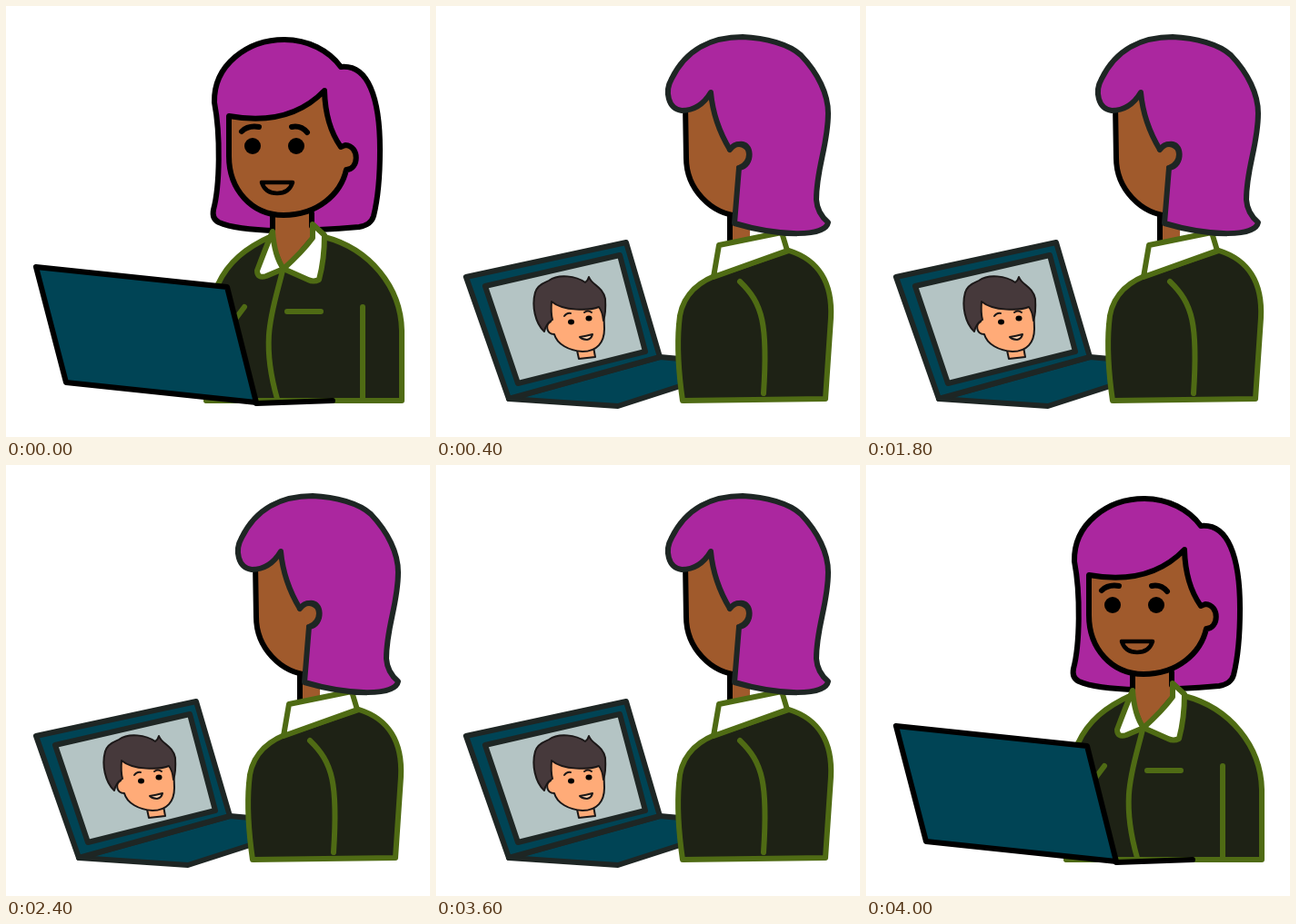
Write an HTML page that moves like this. It is 466 px wide and 474 px high and loops after 4.2 s.

```html
<!DOCTYPE html>
<html lang="en">
<head>
<meta charset="utf-8">
<title>Video call</title>
<style>
html, body { margin: 0; width: 100%; height: 100%; overflow: hidden; background: #fff; }
svg { display: block; width: 466px; height: 474px; }
path { stroke-linecap: round; stroke-linejoin: round; }
.ink, .soft, .coat, .seam, .collar { stroke-width: 6; }
.ink { stroke: #000; }
.soft { stroke: #1e2624; }
.coat, .seam, .collar { stroke: #4f6b14; }
.hair { fill: #ab279f; }
.skin { fill: #a05a2c; }
.coat { fill: #1e2215; }
.collar { fill: #fff; }
.case { fill: #045; }
.glass { fill: #b4c4c4; }
.seam, .line { fill: none; }
.bare { stroke: none; }
.lips { stroke-width: 4.5; }

.pose { visibility: hidden; animation: 4.2s step-end infinite; }
.front { animation-name: front; }
.side { animation-name: side; }
.back { animation-name: back; }
.talk { animation: talk 4.2s step-end infinite; }
@keyframes front {
  0%, 95.238% { visibility: visible; }
  4.762% { visibility: hidden; }
}
@keyframes side {
  0%, 9.524%, 95.238% { visibility: hidden; }
  4.762%, 90.476% { visibility: visible; }
}
@keyframes back {
  0%, 90.476% { visibility: hidden; }
  9.524% { visibility: visible; }
}
@keyframes talk {
  0%, 23.81%, 33.333%, 42.857%, 52.381%, 61.905%, 71.429%, 85.714% { d: path("M158 364Q165 363 172 361Q171 366 166 367Q161 367 158 364Z"); }
  19.048%, 28.571%, 38.095%, 47.619%, 57.143%, 66.667%, 76.19% { d: path("M158 364Q165 362 172 361Q171 369 166 370Q161 369 158 364Z"); }
}
</style>
</head>
<body>
<svg viewBox="0 0 466 474">
  <defs>
    <g id="caller" stroke="#1b1717" stroke-width="2">
      <path fill="#ffab78" d="M154 374L157 388L175 386L173 375Z"/>
      <path fill="#ffab78" d="M126 347C120 350 121 361 130 361C133 372 146 379 161 380C177 380 185 370 185 355L184 325L126 320Z"/>
      <path fill="#46393b" d="M119 358C109 349 105 330 109 315C112 305 121 304 124 302C135 294 154 297 164 304Q167 302 168 298C171 307 183 308 186 322Q187 337 184 346Q183 336 179 331C169 335 140 336 127 325Q126 338 128 345Q121 349 119 358Z"/>
      <path class="line" d="M141 341Q144 337 148 338M163 337Q167 334 171 337"/>
      <g stroke="none">
        <ellipse cx="148.500" cy="347.500" rx="3.500" ry="3"/>
        <ellipse cx="168" cy="343.500" rx="3.500" ry="3"/>
      </g>
      <path class="talk" fill="#ffd0ac" d="M158 364Q165 363 172 361Q171 366 166 367Q161 367 158 364Z"/>
    </g>
  </defs>

  <g class="pose front">
    <path class="hair ink" d="M229 106C228 65 265 37 306 37C332 37 355 49 368 67C398 64 411 101 411 158C411 190 408 215 404 231Q401 241 388 243Q345 247 298 247Q252 246 234 238Q226 234 228 224C235 198 236 142 229 106Z"/>
    <path class="coat" d="M292 253C263 266 244 282 233 306L220 434H435V357C434 309 400 267 350 254Z"/>
    <path class="skin bare" d="M293 222H336V252L306 288L293 255Z"/>
    <path class="ink line" d="M293 228V250M336 228V242"/>
    <path class="skin ink" d="M245 121V165C245 202 270 230 305 230C342 230 368 207 374 180C388 180 389 154 373 153L368 155Q351 131 350 93C322 122 284 128 245 121Z"/>
    <path class="collar" d="M293 248Q285 267 276 291Q276 300 286 297L305 289Q295 275 293 248ZM337 240L350 252Q350 279 344 301Q338 304 332 301L305 289Q326 270 337 255Z"/>
    <path class="seam" d="M304 291C293 336 279 365 298 432M309 336H346M392 331V434M262 331L250 347"/>
    <path class="ink line" d="M259 138Q266 131 278 133M314 133Q324 131 331 139"/>
    <circle cx="271" cy="154" r="9"/>
    <circle cx="319" cy="154" r="9"/>
    <path class="skin ink lips" d="M281 194H315Q311 206 298 206Q285 206 281 194Z"/>
    <path class="ink line" d="M275 437L359 434"/>
    <path class="case ink" d="M33 287L243 309L275 436L66 414Z"/>
  </g>

  <g class="pose side">
    <path class="case soft" d="M117 425L187 412L297 431L249 446Z"/>
    <path class="case soft" d="M58 279L132 274L187 411L117 425Z"/>
    <path class="glass soft" d="M78 295L129 289L173 402L124 411Z"/>
    <use href="#caller" transform="matrix(.705 .192 .2 .715 -46.100 78.300)"/>
    <path class="coat" d="M246 254C214 276 199 313 202 345Q207 389 214 429L408 426V355C408 307 376 274 335 255L268 249Z"/>
    <path class="skin bare" d="M268 215H296V241L271 256Z"/>
    <path class="ink line" d="M268 222V255"/>
    <path class="collar" d="M245 253L265 243L259 262L251 274ZM270 256L287 287L335 255L322 239L294 240Z"/>
    <path class="seam" d="M268 254C252 310 244 353 251 425M270 326L309 327M331 303C348 334 349 350 346 422"/>
    <path class="skin ink" d="M219 117V155C220 195 252 224 295 223L312 145L256 80Z"/>
    <path class="hair ink" d="M217 121L206 104C203 61 238 28 281 28C338 28 379 70 379 135C379 164 370 194 372 206Q374 216 380 222Q378 233 366 235Q330 243 292 236C299 210 296 190 295 173C307 168 303 143 291 143Q283 143 281 148Q263 127 255 87Q254 97 241 102Q221 111 217 121Z"/>
    <path class="skin ink" d="M281 148C285 140 301 142 301 157Q301 167 294 172"/>
    <path class="ink line" d="M239 131Q250 128 257 136"/>
    <ellipse cx="245" cy="151" rx="7" ry="9.500"/>
    <path class="skin ink lips" d="M229 190L247 189Q245 199 239 200Z"/>
  </g>

  <g class="pose back">
    <path class="case soft" d="M80 432L246 386L290 390V411L200 440Z"/>
    <path class="case soft" d="M33 298L209 260L246 386L80 432Z"/>
    <path class="glass soft" d="M54 308L202 274L230 380L90 415Z"/>
    <use href="#caller"/>
    <path class="skin bare" d="M323 220H345V262H323Z"/>
    <path class="ink line" d="M323 228V258"/>
    <path class="coat" d="M306 297C284 306 268 323 267 350Q264 385 271 434L428 432L434 343C436 304 420 279 388 269Z"/>
    <path class="collar" d="M311 263L380 249L386 269L305 298Z"/>
    <path class="seam" d="M334 303C359 327 365 350 360 426"/>
    <path class="skin ink" d="M274 108L275 167C275 201 302 229 334 231L348 145L305 85Z"/>
    <path class="hair soft" d="M270 115C255 113 251 94 259 80C275 47 304 34 337 34C362 35 388 42 401 54C420 74 431 97 431 118C431 153 418 178 418 213Q419 228 431 238C428 254 379 254 328 239L333 178C349 176 348 149 333 152Q328 153 323 158Q305 128 302 95Q290 115 270 115Z"/>
    <path class="skin soft" d="M323 158C331 147 344 153 344 163Q344 174 333 178"/>
  </g>
</svg>
</body>
</html>
```
